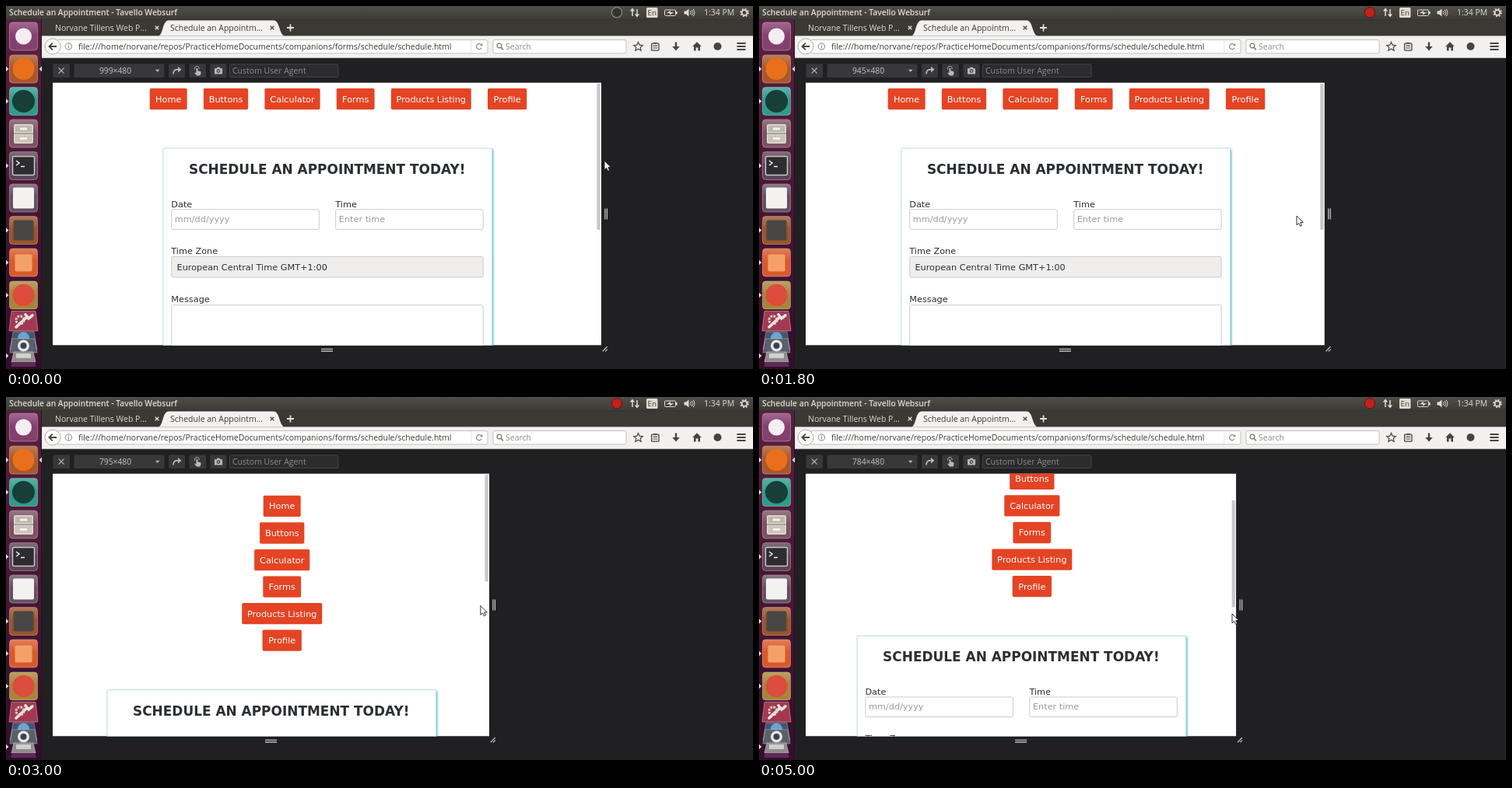
Animation of 960 by 467 pixels, one loop 5100 ms. Source, as an HTML page:

```html
<!DOCTYPE html>
<html lang="en">
<head>
<meta charset="utf-8">
<title>Schedule an Appointment</title>
<style>
html, body { margin: 0; width: 100%; height: 100%; overflow: hidden; background: #202022; }
svg { display: block; width: 960px; height: 467px; }
.ui { font-family: "Open Sans", sans-serif; font-size: 10.5px; }
.web { font-family: "DejaVu Sans", sans-serif; font-size: 11.29px; }
text { white-space: pre; }
</style>
</head>
<body>
<svg id="stage" viewBox="0 0 960 467"></svg>
<script>
const LOOP = 5100, STEP = 100;
const SCALE = 705 / 999;      // stage pixels per page pixel
const LEFT = 60, TOP = 98.4, HEIGHT = 338.2;

const rect = (x, y, w, h, fill, more = '') =>
  `<rect x="${x}" y="${y}" width="${w}" height="${h}" fill="${fill}" ${more}/>`;
const disc = (x, y, r, fill, more = '') =>
  `<circle cx="${x}" cy="${y}" r="${r}" fill="${fill}" ${more}/>`;
const text = (x, y, str, fill, more = '') =>
  `<text x="${x}" y="${y}" fill="${fill}" ${more}>${str}</text>`;
const line = (d, stroke, w = 1, more = '') =>
  `<path d="${d}" fill="none" stroke="${stroke}" stroke-width="${w}" ${more}/>`;
const shape = (d, fill, more = '') => `<path d="${d}" fill="${fill}" ${more}/>`;
const group = (id, body, more = '') => `<g id="${id}" ${more}>${body}</g>`;
const middle = 'text-anchor="middle"';

const defs = `<defs>
  <linearGradient id="panel" x2="0" y2="1"><stop stop-color="#514e47"/><stop offset="1" stop-color="#3c3b37"/></linearGradient>
  <linearGradient id="dock" x2="0" y2="1"><stop stop-color="#58203f"/><stop offset=".5" stop-color="#481732"/><stop offset="1" stop-color="#330e2b"/></linearGradient>
  <linearGradient id="gloss" x2="0" y2="1"><stop stop-color="#fff" stop-opacity=".22"/><stop offset="1" stop-color="#fff" stop-opacity="0"/></linearGradient>
  <filter id="soft" x="-5%" y="-5%" width="110%" height="110%"><feGaussianBlur stdDeviation="1.2"/></filter>
  <clipPath id="view"><rect id="viewRect" x="${LEFT}" y="${TOP}" width="705" height="${HEIGHT}"/></clipPath>
</defs>`;

function topPanel() {
  const c = '#dfdbd2';
  return rect(0, 0, 960, 17.5, 'url(#panel)') +
    text(4, 12.2, 'Schedule an Appointment - Tavello Websurf', c, 'font-weight="600" font-size="10.3"') +
    disc(785, 8.3, 6.6, '#dfdbd2', 'id="rec"') +
    line('M805 13V4M802.6 6.6L805 3.6L807.4 6.6M811 4V13M808.6 10.4L811 13.4L813.4 10.4', c, 1.5) +
    rect(823, 2, 14.5, 13, c, 'rx="1.5"') +
    text(830.2, 12, 'En', '#3c3b37', middle + ' font-size="9.8"') +
    rect(846.5, 5, 14, 7.5, 'none', `rx="1" stroke="${c}"`) + rect(861, 7, 1.6, 3.5, c) +
    shape('M848.5 9.2L854 6V8.2H858.5L853 11.6V9.2Z', c) +
    shape('M871.5 6.6H874L877.5 3.6V13.4L874 10.6H871.5Z', c) +
    line('M879.3 6.2Q881 8.5 879.3 10.8M881.3 4.9Q884 8.5 881.3 12.1M883.2 3.8Q886.6 8.5 883.2 13.2', c) +
    text(897, 12.2, '1:34 PM', c) +
    disc(949, 8.5, 3.4, 'none', `stroke="${c}" stroke-width="1.8"`) +
    disc(949, 8.5, 4.9, 'none', `stroke="${c}" stroke-width="1.7" stroke-dasharray="1.9 1.95"`);
}

function tabs() {
  const cross = (x, c) => line(`M${x - 2.3} 25.7l4.6 4.6m0 -4.6l-4.6 4.6`, c, 1.5);
  return rect(46, 17.5, 914, 21, '#3b3934') +
    text(63, 32, 'Norvane Tillens Web P…', '#dcd8cf') + cross(194, '#dcd8cf') +
    shape('M196 38.6C202 37 201 18.6 209 18.6H344C352 18.6 351 37 358 38.6Z', '#f2f1f0') +
    text(211, 32, 'Schedule an Appointm…', '#3c3b37') + cross(342, '#55534e') +
    line('M361 28H370M365.5 23.5V32.5', '#e4e0d8', 1.8);
}

function navBar() {
  const c = '#46453f';
  return rect(46, 38.4, 914, 28.6, '#f2f1f0') + rect(46, 66.2, 914, .9, '#bdbab5') +
    rect(66, 43.5, 553, 17.4, '#fff', 'rx="2" stroke="#bdbbb7" stroke-width=".9"') +
    disc(60, 52, 10, '#fbfbfa', 'stroke="#a9a7a2" stroke-width=".9"') +
    line('M65 52H56M59.8 47.7L55.5 52L59.8 56.3', c, 1.9) +
    disc(80.3, 52, 4.2, 'none', 'stroke="#77756f" stroke-width=".9"') +
    line('M80.3 51.4V54.4M80.3 49.4V50.4', '#77756f', 1.1) +
    text(93, 55.8, 'file:///home/norvane/repos/PracticeHomeDocuments/companions/forms/schedule/schedule.html', '#3a3935') +
    rect(597.5, 44, .8, 16.4, '#dddbd8') +
    line('M610.9 50A3.5 3.5 0 1 0 611.2 53.8', '#8b8984', 1.2) + shape('M612.4 47.8V51.2H609Z', '#8b8984') +
    rect(626, 43.5, 171, 17.4, '#fff', 'rx="2" stroke="#bdbbb7" stroke-width=".9"') +
    disc(634, 51, 2.9, 'none', 'stroke="#77756f" stroke-width="1.2"') + line('M636 53.2L639 56.3', '#77756f', 1.5) +
    text(642, 55.8, 'Search', '#8e8c88') +
    line('M812.5 46.4L814.2 50.2L818.2 50.6L815.2 53.3L816.1 57.3L812.5 55.2L808.9 57.3L809.8 53.3L806.8 50.6L810.8 50.2Z', c, 1.2) +
    rect(829.6, 48.2, 9.4, 9, 'none', `rx="1" stroke="${c}" stroke-width="1.3"`) +
    line('M832 47.6H836.6M831.4 51.2H837.2M831.4 54H837.2', c, 1.2) +
    line('M861 46.5V54', c, 2.4) + shape('M856.3 52H865.7L861 57.6Z', c) +
    shape('M888 46.2L893.8 52H892V57.5H889.4V53.5H886.6V57.5H884V52H882.2Z', c) +
    disc(914.5, 52, 5, c) +
    line('M939.4 48H950.6M939.4 52H950.6M939.4 56H950.6', c, 1.9);
}

function toolBar() {
  const c = '#b9b9bb', box = (x, w) => rect(x, 74.6, w, 17.4, '#38383b', 'rx="1.5"');
  return rect(46, 67, 914, 400, '#202022') +
    box(60.5, 21.5) + line('M67.6 79.6l7 7m0 -7l-7 7', c, 1.2) +
    box(87.5, 116) + text(140.5, 87, '', '#c4c4c6', middle + ' id="size" font-size="10.3"') +
    shape('M192 81.7H197.4L194.7 85Z', c) +
    box(209, 21) + line('M215 87.5C215 82.5 218 81.4 222 81.6', c, 1.8) + shape('M221 78L225.5 81.8L221 85.6Z', c) +
    box(235.5, 21.5) +
    shape('M244.4 80.4Q245.6 79.3 246.4 80.6V83.2L250.4 84.2Q251 87.5 249.4 89.6H245L242 85.8L244.4 86Z', c) +
    line('M242.8 81.5A2.8 2.8 0 1 1 248 81.2', c, 1) +
    box(262.5, 21) + shape('M268 80.2H270.6L271.4 78.8H274.6L275.4 80.2H278V87.6H268Z', c) +
    disc(273, 83.6, 2.3, '#38383b') + disc(273, 83.6, 1.2, c) +
    rect(287.5, 75, 139.5, 16.4, '#2c2c2f', 'rx="1.5" stroke="#48484b" stroke-width=".9"') +
    text(291, 86.8, 'Custom User Agent', '#8d8d90');
}

function dock() {
  const tile = (y, fill, body, x = 4, s = 37) =>
    rect(x + .5, y - s / 2 + .5, s - 1, s - 1, fill, 'rx="4" stroke="#fff" stroke-opacity=".32"') +
    rect(x + 1, y - s / 2 + 1, s - 2, 16, 'url(#gloss)', 'rx="3.5"') + body;
  const mark = y => shape(`M0 ${y - 3.2}L3.3 ${y}L0 ${y + 3.2}Z`, '#e6dde2');
  const cabinet = rect(10, 152, 25, 25, '#d9d4cb', 'rx="2"') + rect(10, 163.5, 25, 1.2, '#8b857c') +
    rect(12, 154, 21, 8, '#bfb8ad') + rect(12, 166, 21, 9, '#cbc5ba') +
    rect(18, 156.5, 9, 3, '#f4f2ee') + rect(18, 169, 9, 3, '#f4f2ee');
  const shell = rect(8.5, 193.5, 28, 24, '#2d2d30', 'rx="2" stroke="#c9c6c2" stroke-width="1.5"') +
    line('M13 199l4 3l-4 3M19 206.5H24', '#f0f0f0', 1.5);
  return rect(0, 17.5, 46, 449.5, 'url(#dock)') + rect(45, 17.5, 1, 449.5, '#2a1023') +
    tile(39, '#84406f', disc(22.5, 39, 10.5, '#f4eef2')) +
    tile(81, '#a95829', disc(22.5, 81, 14, '#e8701c')) +
    tile(122.5, '#2d9c8d', disc(22.5, 122.5, 14.5, '#173f38')) +
    tile(164, '#7c5163', cabinet) +
    tile(205.5, '#5a4458', shell) +
    tile(247, '#665064', rect(9, 233.5, 27, 27, '#f3f2f0', 'rx="2"')) +
    tile(288.5, '#9a5428', rect(9.5, 275.5, 26, 26, '#484746', 'rx="3"')) +
    tile(330, '#d9582c', rect(11.5, 319.5, 22, 22, '#f4a06a', 'rx="2"')) +
    tile(372, '#a9843b', disc(22.5, 372, 14, '#dc4b3c')) +
    shape('M7 392.5H38L41 418H4Z', '#a33951', 'stroke="#d7a0ad" stroke-opacity=".6"') +
    line('M13 413L27 400M25 397L29 402L34 398', '#e8e6e4', 3.6, 'stroke-linecap="round"') +
    disc(18, 404, 5, 'none', 'stroke="#d9d4d2" stroke-width="3" stroke-dasharray="2.6 1.3"') +
    shape('M9 419H36L40 442H5Z', '#45566d', 'stroke="#a9b4c2" stroke-opacity=".5"') +
    disc(22.5, 427, 7.5, '#6fa3cd') +
    shape('M8 428H37L40 446H5Z', '#59606a', 'stroke="#b8bcc2" stroke-opacity=".5"') +
    disc(22.5, 437, 7.5, '#e3e5e8') + disc(22.5, 437, 4, '#3c424b') +
    shape('M10 445H35L38 458H7Z', '#8f8c8d', 'stroke="#c9c5c6" stroke-opacity=".6"') +
    rect(13, 447, 19, 6, '#d3d0cc') +
    shape('M8 458H37L39 464H6Z', '#5d2b56') +
    [81, 122.5, 205.5, 288.5, 330, 372, 450].map(mark).join('') +
    shape('M46 77.6L42.6 81L46 84.4Z', '#e6dde2');
}

const links = [['Home', 48], ['Buttons', 57.3], ['Calculator', 71.2], ['Forms', 48.8], ['Products Listing', 103], ['Profile', 50.3]];
const button = (x, y, w, label) => rect(x, y, w, 27.3, '#e44424', 'rx="1.8"') +
  text(x + w / 2, y + 17.6, label, '#fff', middle);

function navRow() {
  let x = -242.2;
  return links.map(([label, w]) => {
    const b = button(x, 105.9, w, label);
    x += w + 21.2;
    return b;
  }).join('');
}
const navStack = () => links.map(([label, w], i) => button(-w / 2, 126.8 + i * 34.55, w, label)).join('');

// Form card, horizontally centred on 0 with its top edge at 0
function card() {
  const field = (x, y, w, h, fill = '#fff') => rect(x, y, w, h, fill, 'rx="2" stroke="#c6c6c6" stroke-width=".9"');
  const ink = '#2b2f33', hint = '#9a9a9a';
  return rect(-210, 1, 423, 400, '#4fb4d8', 'rx="2" filter="url(#soft)"') +
    rect(-211.3, 0, 422.8, 400, '#fff', 'rx="1.5" stroke="#b9d7e2" stroke-width=".9"') +
    text(-.6, 33.2, 'SCHEDULE AN APPOINTMENT TODAY!', ink, middle + ' font-weight="bold" font-size="16.94"') +
    text(-201, 75.5, 'Date', ink) + text(10, 75.5, 'Time', ink) +
    field(-200.5, 78.8, 189.5, 25.6) + field(10.4, 78.8, 189.5, 25.6) +
    text(-196.5, 95.2, 'mm/dd/yyyy', hint) + text(14.5, 95.2, 'Enter time', hint) +
    text(-201, 136.2, 'Time Zone', ink) + field(-200.5, 139.4, 400.4, 26.6, '#efeeed') +
    text(-193.8, 156.8, 'European Central Time GMT+1:00', ink) +
    text(-201, 198.2, 'Message', ink) + field(-200.5, 201.8, 400.4, 110);
}

const grip = '#c2c2c4';
const page = `<g clip-path="url(#view)" class="web">` +
  rect(LEFT, TOP, 705, HEIGHT, '#fff', 'id="paper"') +
  group('row', navRow()) + group('stack', navStack()) + group('card', card()) +
  rect(0, 0, 4.2, 100, '#c8c8cc', 'id="thumb" rx="1"') + '</g>';
const handles =
  group('side', line('M4.9 260.5V274.5M7.4 260.5V274.5', grip, 1.3)) +
  group('foot', line('M-7.5 441.3H7.5M-7.5 444H7.5', grip, 1.3)) +
  group('corner', line('M1.6 444.4L7.6 438.2M5 444.4L7.8 441.6', grip, 1.3));
const pointer = group('pointer',
  shape('M0 0V11.8L2.7 9.3L4.5 13.3L6.5 12.4L4.8 8.5H8.4Z', '#fff', 'stroke="#1c1c1c" stroke-width=".9" stroke-linejoin="round"'));

const $ = id => document.getElementById(id);
$('stage').innerHTML = defs + '<g class="ui">' + toolBar() + tabs() + navBar() + topPanel() + dock() + '</g>' +
  page + handles + pointer;

// [time, value...] tracks, linear between keys
const widthKeys = [[1500, 999], [1800, 945], [2200, 893], [2400, 832], [2700, 826], [3100, 784]];
const scrollKeys = [[4500, 0], [4800, 36], [5000, 69.6]];
const pointerKeys = [[0, 769, 199], [300, 767, 235], [600, 760, 274], [900, 769, 270], [1200, 769, 270], [1500, 730, 270],
  [1800, 691, 270], [2200, 647.5, 271], [2700, 618.5, 270], [3100, 607, 268], [3600, 606, 183], [4300, 606, 183], [5000, 608, 279]];

function at(keys, t, k = 1) {
  const i = keys.findIndex(key => key[0] > t);
  if (i === 0) return keys[0][k];
  if (i < 0) return keys[keys.length - 1][k];
  const a = keys[i - 1], b = keys[i];
  return a[k] + (b[k] - a[k]) * (t - a[0]) / (b[0] - a[0]);
}

const put = (id, attrs) => { for (const k in attrs) $(id).setAttribute(k, attrs[k]); };
const move = (id, x, y) => put(id, { transform: `translate(${x} ${y})` });

function draw(time) {
  const t = Math.floor(time % LOOP / STEP) * STEP;
  const size = Math.round(at(widthKeys, t)), w = size * SCALE;
  const right = LEFT + w, mid = LEFT + w / 2;
  const scroll = at(scrollKeys, t), narrow = size <= 850;

  $('size').textContent = size + '×480';
  put('viewRect', { width: w });
  put('paper', { width: w });
  put('row', { display: narrow ? 'none' : 'inline' });
  put('stack', { display: narrow ? 'inline' : 'none' });
  move('row', mid + 14.4, -scroll);
  move('stack', mid + 14.2, -scroll);
  move('card', mid + .8, (narrow ? 376.8 : 183) - scroll);
  put('thumb', { x: right - 5.6, y: 100 + scroll * .475, height: narrow ? 137.5 : 188 });
  move('side', right, 0);
  move('foot', mid, 0);
  move('corner', right, 0);
  move('pointer', at(pointerKeys, t), at(pointerKeys, t, 2));
  put('rec', t < 100
    ? { fill: '#35342f', stroke: '#8a8780', 'stroke-width': 1.2 }
    : { fill: '#c3211b', stroke: '#5e1512', 'stroke-width': 1 });
}

function tick() {
  draw(performance.now());
  requestAnimationFrame(tick);
}
tick();
</script>
</body>
</html>
```
